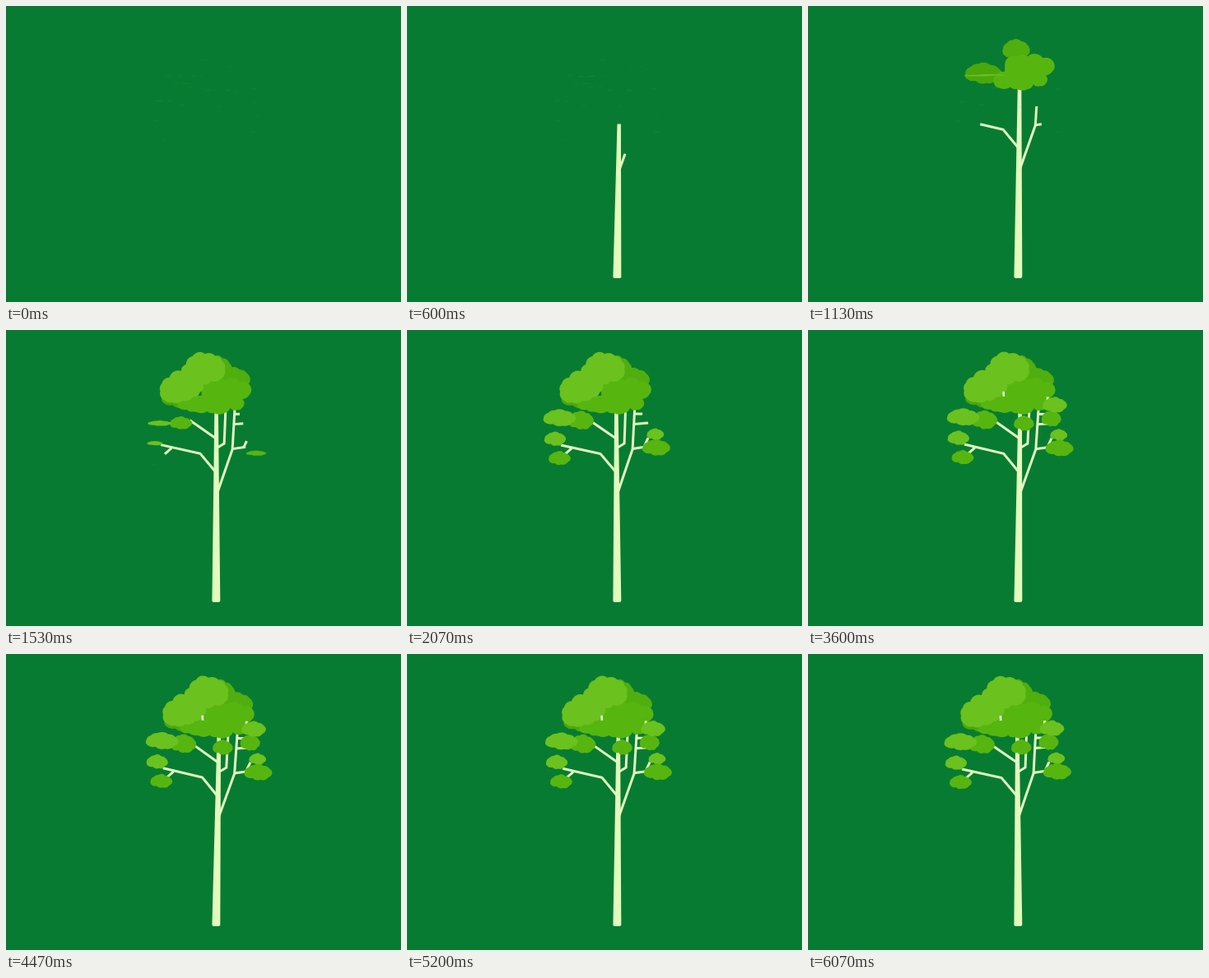
An HTML page without scripts for the animation above (6140 ms loop, 480 px wide and 360 px high).

```html
<!DOCTYPE html>
<html lang="en">
<head>
<meta charset="utf-8">
<title>Growing tree</title>
<style>
@property --t { syntax: '<number>'; inherits: true; initial-value: 0; }
@keyframes clock { from { --t: 0; } to { --t: 6140; } }

html, body { margin: 0; width: 100%; height: 100%; overflow: hidden; background: #087b33; }
svg { display: block; width: 100%; height: 100%; animation: clock 6140ms linear infinite; }

/* --d: start, --n: length, both in ms on the shared clock */
.trunk, .twig, .pop { --p: clamp(0, (var(--t) - var(--d)) / var(--n, 400), 1); }

.sway {
  transform-origin: 255px 331px;
  transform: rotate(calc(.575deg * (1 + cos((var(--t) - 4270) * .09deg))));
}
.trunk {
  fill: #e1fbbd;
  transform-origin: 255px 331px;
  transform: scaleY(var(--p));
}
.twig {
  fill: none; stroke: #e1fbbd; stroke-width: 3;
  stroke-dasharray: 1 2;
  stroke-dashoffset: calc((1 - var(--p)) * 1px);
}
/* leaves spring up from their lower edge with a slight overshoot */
.pop {
  --q: calc(var(--p) - 1);
  --s: calc(1 + 2.5 * var(--q) * var(--q) * var(--q) + 1.5 * var(--q) * var(--q));
  transform-box: fill-box;
  transform-origin: 50% 100%;
  transform: scale(calc(.6 + .4 * var(--s)), var(--s));
}
.pinned { transform-box: view-box; transform-origin: var(--o); }
.light { fill: #6bc11d; }
.mid { fill: #57b50f; }
.dark { fill: #4ba80a; }
.back { fill: #50ae0e; }
</style>
</head>
<body>
<svg viewBox="0 0 480 360">
  <defs>
    <path id="leaf" d="M-14 0A7 7 0 0 1-10-6A7 7 0 0 1-4-9A7 7 0 0 1 5-8A7 7 0 0 1 11-5A7 7 0 0 1 14 1A7 7 0 0 1 10 6A7 7 0 0 1 2 9A7 7 0 0 1-6 7A7 7 0 0 1-13 5A5 5 0 0 1-14 0z"/>
  </defs>
  <g class="sway">
    <!-- trunk and branches -->
    <path class="trunk" style="--d:40;--n:715" d="M250.4 329L252 92h4.4L260.3 329q0 2-2 2h-6q-2 0-1.9-2z"/>
    <path class="twig" pathLength="1" style="--d:430;--n:920" d="M256 198L274 145L276.5 97"/>
    <path class="twig" pathLength="1" style="--d:650;--n:650" d="M254 173L235 150.5L187 140"/>
    <path class="twig" pathLength="1" style="--d:1050;--n:170" d="M274 144.500L290 142"/>
    <path class="twig" pathLength="1" style="--d:1150;--n:300" d="M254 132L222 110"/>
    <path class="twig" pathLength="1" style="--d:1150;--n:400" d="M255 143.500L264 138L265.500 95"/>
    <path class="twig" pathLength="1" style="--d:1350;--n:200" d="M200 144L191 152"/>
    <path class="twig" pathLength="1" style="--d:1400;--n:200" d="M276 102h10"/>
    <path class="twig" pathLength="1" style="--d:1400;--n:200" d="M275.500 114.500L293 113"/>
    <path class="twig" pathLength="1" style="--d:1400;--n:200" d="M288 142L293 131"/>

    <!-- crown -->
    <g class="pop dark" style="--d:730"><use href="#leaf" transform="translate(210.500 82.500) scale(1.6 1.3)"/></g>
    <g class="pop back" style="--d:1200"><use href="#leaf" transform="translate(275 60) scale(1.42 1.4)"/></g>
    <g class="pop pinned back" style="--d:1042;--o:207px 66px"><use href="#leaf" transform="translate(255 48.500) scale(1.32 1.75)"/></g>
    <g class="pop mid" style="--d:1200"><use href="#leaf" transform="translate(226 90) scale(1.35 1)"/></g>
    <path class="pop mid" style="--d:720" d="M236 73A12 12 0 0 1 240 63A12 12 0 0 1 251 61A12 12 0 0 1 264 61A12 12 0 0 1 282 63A12 12 0 0 1 294 66A9 9 0 0 1 294 79A12 12 0 0 1 286 84A7 7 0 0 1 286 94A7 7 0 0 1 279 97A7 7 0 0 1 271 95A9 9 0 0 1 264 101A14 14 0 0 1 251 101A9 9 0 0 1 243 99A14 14 0 0 1 230 100A7 7 0 0 1 223 94A7 7 0 0 1 225 85A12 12 0 0 1 236 80z"/>
    <path class="pop pinned light" style="--d:1127;--o:190px 86px" d="M191 86A9 9 0 0 1 186 75A9 9 0 0 1 188 65A9 9 0 0 1 197 58A11 11 0 0 1 211 50A9 9 0 0 1 217 42A10 10 0 0 1 225 32A10 10 0 0 1 240 29A12 12 0 0 1 253 32A8 8 0 0 1 261 38A9 9 0 0 1 264 48A9 9 0 0 1 260 59A10 10 0 0 1 248 62A10 10 0 0 1 238 66A9 9 0 0 1 234 76A9 9 0 0 1 225 82A10 10 0 0 1 213 86A11 11 0 0 1 200 88A9 9 0 0 1 191 86z"/>
    <path class="twig" pathLength="1" style="--d:2150;--n:250" d="M234 81v-6"/>
    <path class="twig" pathLength="1" style="--d:2100;--n:200" d="M287.500 88v-7"/>

    <!-- left side -->
    <g class="pop mid" style="--d:1450"><use href="#leaf" transform="translate(211.500 110) scale(1.1 1.15)"/></g>
    <g class="pop light" style="--d:1500"><use href="#leaf" transform="translate(185.500 107) scale(1.4 1.05)"/></g>
    <g class="pop light" style="--d:1500"><use href="#leaf" transform="translate(180 132.500) scale(.93 .87)"/></g>
    <g class="pop mid" style="--d:1550"><use href="#leaf" transform="translate(185.500 156) scale(.95 .85)"/></g>

    <!-- right side -->
    <g class="pop light" style="--d:1550"><use href="#leaf" transform="translate(301.800 126.800) scale(.74 .7)"/></g>
    <g class="pop mid" style="--d:1500"><use href="#leaf" transform="translate(303 143) scale(1.2 1)"/></g>
    <g class="pop mid" style="--d:2100"><use href="#leaf" transform="translate(292.500 107) scale(.85 1)"/></g>
    <g class="pop light" style="--d:2150"><use href="#leaf" transform="translate(296.500 90.500) scale(1.05 .95)"/></g>

    <g class="pop mid" style="--d:2200"><use href="#leaf" transform="translate(259.300 113.500) scale(.87 .93)"/></g>
  </g>
</svg>
</body>
</html>
```
